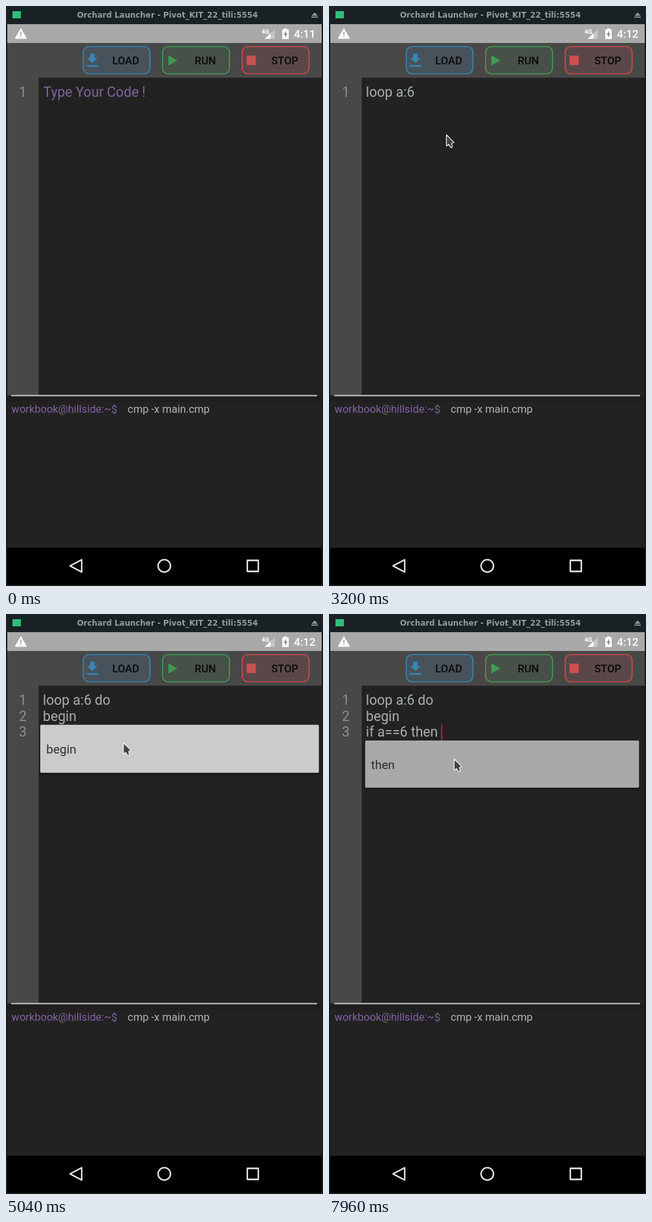
Write an HTML page that moves like this. It is 490 px wide and 894 px high and loops after 8000 ms.

```html
<!DOCTYPE html>
<html lang="en">
<head>
<meta charset="utf-8">
<title>Code editor</title>
<style>
  html, body { margin: 0; width: 100%; height: 100%; overflow: hidden; background: #141a1c; }
  svg { display: block; width: 100vw; height: 100vh; }
  text { font-family: Roboto, sans-serif; white-space: pre; }
  .title { font: bold 11.9px "DejaVu Sans", sans-serif; fill: #929c9d; }
  .code { font-size: 21.2px; fill: #a9b0ad; }
  .num { font-size: 21.2px; fill: #8f8f8f; text-anchor: middle; }
  .btn { font-size: 16.5px; font-weight: 500; fill: #0a0a0a; text-anchor: middle; }
  .term { font-size: 16.55px; }
  .clock { font-size: 17px; font-weight: 500; fill: #fff; }
</style>
</head>
<body>
<svg viewBox="0 0 490 894">
  <rect width="490" height="894" fill="#141a1c"/>
  <rect width="490" height="28" fill="#1a2124"/>
  <rect x="10" y="8" width="13" height="11" fill="#2fbf7c"/>
  <text class="title" x="249.5" y="18" text-anchor="middle">Orchard Launcher - Pivot_KIT_22_tili:5554</text>
  <path d="M477 10L482 15H472ZM472 16.3H482V18H472Z" fill="#8f999b"/>

  <rect x="2" y="28" width="486" height="29.5" fill="#a9a9a9"/>
  <path d="M23 34L32.5 50.5H13.5Z" fill="#fff"/>
  <path d="M22.1 39.5H23.9V45H22.1ZM22.1 46.5H23.9V48.2H22.1Z" fill="#a9a9a9"/>
  <text x="395" y="43" font-size="9.5" font-weight="700" fill="#fff">4G</text>
  <path d="M415.5 36V50.5H400Z" fill="#c8c8c8"/>
  <path d="M409 42V50.5H400Z" fill="#fff"/>
  <path d="M430 34.5H434V36.2H437V51H427V36.2H430Z" fill="#fff"/>
  <path d="M433 38L429 44.5H431.6V49L435.2 42.5H433Z" fill="#909090"/>
  <text class="clock" id="clock" x="445" y="48.8"></text>

  <rect x="2" y="57" width="486" height="543" fill="#484848"/>
  <rect x="50.5" y="110.5" width="437.5" height="490" fill="#222"/>
  <g stroke-width="1.7">
    <rect x="119.5" y="62.5" width="103" height="42" rx="9" fill="#47525a" stroke="#3786b4"/>
    <rect x="242" y="62.5" width="103.500" height="42" rx="9" fill="#475148" stroke="#419a54"/>
    <rect x="365" y="62.5" width="103.500" height="42" rx="9" fill="#5a4848" stroke="#c84b4c"/>
  </g>
  <path d="M130 73.500H137V80H142L133.500 88L125 80H130ZM124.500 91H142.500V93.500H124.500Z" fill="#3786b4"/>
  <path d="M251 76L265 84L251 92Z" fill="#419a54"/>
  <rect x="372" y="76.500" width="14" height="14.500" fill="#cc5152"/>
  <text class="btn" x="185" y="90">LOAD</text>
  <text class="btn" x="308" y="90">RUN</text>
  <text class="btn" x="431" y="90">STOP</text>

  <rect x="2" y="600" width="486" height="235" fill="#222"/>
  <rect x="2" y="602" width="486" height="8" fill="#1e1e1e"/>
  <rect x="8" y="599.600" width="473" height="1.800" rx=".9" fill="#c6c6c6"/>
  <text class="term" x="8.500" y="627" fill="#7f649e">workbook@hillside:~$</text>
  <text class="term" x="188" y="627" fill="#b2bab5">cmp -x main.cmp</text>

  <rect x="2" y="835" width="486" height="57" fill="#000"/>
  <g fill="none" stroke="#e6e6e6" stroke-width="2.300" stroke-linejoin="round">
    <path d="M99 863L117 853.500V872.500Z"/>
    <circle cx="244.700" cy="863" r="9.600"/>
    <rect x="373" y="854.500" width="17" height="17"/>
  </g>

  <text class="code" id="hint" x="57.500" y="140" style="fill:#7f649e">Type Your Code !</text>
  <g id="lines"></g>
  <rect id="caret" width="2" height="24.500" fill="#b5184f"/>
  <g id="popup">
    <rect x="48" y="3" width="441" height="77" rx="4" fill="#000" opacity=".16"/>
    <rect x="49" y="1" width="439.500" height="76.500" rx="3" fill="#000" opacity=".25"/>
    <rect x="50" width="438" height="75.300" rx="2" fill="#ededed"/>
    <text id="word" x="59.500" y="45" font-size="19.300" fill="#303030"></text>
  </g>
  <path id="mouse" d="M.5 .5V18L4 15.300L7.500 20.500L9.500 19.500L8.700 13.500L12.300 12.300Z"
        fill="#444" stroke="#f2f2f2" stroke-width="1.200" stroke-linejoin="round"/>
</svg>
<script>
const LOOP = 8000, BLINK = 240, LEFT = 57, ROW = 24.7;
const $ = id => document.getElementById(id);

// [time, key]; the empty key is the tap that focuses the editor
const keys = [
  [520, ""], [760, "l"], [900, "o"], [1080, "o"], [1240, "p"], [1400, " "],
  [1880, "a"], [2280, ":"], [2720, "6"], [2960, " "], [3300, "d"], [3440, "o"], [3760, "\n"],
  [4380, "b"], [4560, "e"], [4720, "g"], [4820, "i"], [4920, "n"], [5020, "\n"],
  [5140, "i"], [5260, "f"], [5760, " "], [6200, "a"], [6400, "="], [6560, "="],
  [6960, "6"], [7280, " "], [7440, "t"], [7560, "h"], [7680, "e"], [7800, "n"], [7920, " "]
];
// [word, row, open, close]
const popups = [
  ["loop", 0, 960, 1400], ["do", 0, 3490, 3760], ["begin", 1, 4640, 5020],
  ["if", 2, 5310, 5760], ["then", 2, 7610, 7920]
];
// [time, x, y]
const path = [[80, 486, 262], [560, 181, 198], [5860, 181, 198], [6240, 193, 223]];
const FADE = 120;

const pen = document.createElement("canvas").getContext("2d");
pen.font = "21.2px Roboto, sans-serif";

function addText(cls, x, y) {
  const el = document.createElementNS("http://www.w3.org/2000/svg", "text");
  el.setAttribute("class", cls);
  el.setAttribute("x", x);
  el.setAttribute("y", y);
  return $("lines").appendChild(el);
}
const rows = [0, 1, 2].map(i => ({
  num: addText("num", 26, 140 + i * ROW),
  code: addText("code", LEFT, 140 + i * ROW)
}));

const clamp = v => Math.max(0, Math.min(1, v));
const ease = v => v * v * (3 - 2 * v);
const show = (el, on) => el.setAttribute("visibility", on ? "visible" : "hidden");

function drawCode(t) {
  const typed = keys.filter(k => k[0] <= t);
  const text = typed.map(k => k[1]).join("");
  const lines = text.split("\n");
  rows.forEach((row, i) => {
    row.num.textContent = i < lines.length ? i + 1 : "";
    row.code.textContent = lines[i] || "";
  });
  show($("hint"), !text);

  const last = typed.length ? typed[typed.length - 1][0] : -1;
  const row = lines.length - 1;
  $("caret").setAttribute("x", LEFT - .3 + pen.measureText(lines[row]).width);
  $("caret").setAttribute("y", 121 + row * ROW);
  show($("caret"), last >= 0 && Math.floor((t - last) / BLINK) % 2 === 0);
}

function drawPopup(t) {
  const p = popups.find(p => t >= p[2] && t < p[3] + FADE);
  show($("popup"), p);
  if (!p) return;
  const [word, row, open, close] = p;
  const k = clamp((t - open + 30) / FADE) * (1 - clamp((t - close) / FADE));
  const s = .9 + .1 * k, top = 196 + (row - 2) * ROW;
  $("word").textContent = word;
  $("popup").setAttribute("opacity", k);
  $("popup").setAttribute("transform",
    `translate(226 ${top - 29}) scale(${s}) translate(-226 29)`);
}

function drawMouse(t) {
  show($("mouse"), t >= path[0][0]);
  let [, x, y] = path[0];
  for (let i = 1; i < path.length; i++) {
    const [t0, x0, y0] = path[i - 1], [t1, x1, y1] = path[i];
    if (t < t0) break;
    const k = ease(clamp((t - t0) / (t1 - t0)));
    x = x0 + (x1 - x0) * k;
    y = y0 + (y1 - y0) * k;
  }
  $("mouse").setAttribute("transform", `translate(${x} ${y})`);
}

function draw(t) {
  $("clock").textContent = t < 2200 ? "4:11" : "4:12";
  drawCode(t);
  drawPopup(t);
  drawMouse(t);
}

let start;
function tick(now) {
  start ??= now;
  draw((now - start) % LOOP);
  requestAnimationFrame(tick);
}
draw(0);
requestAnimationFrame(tick);
</script>
</body>
</html>
```
